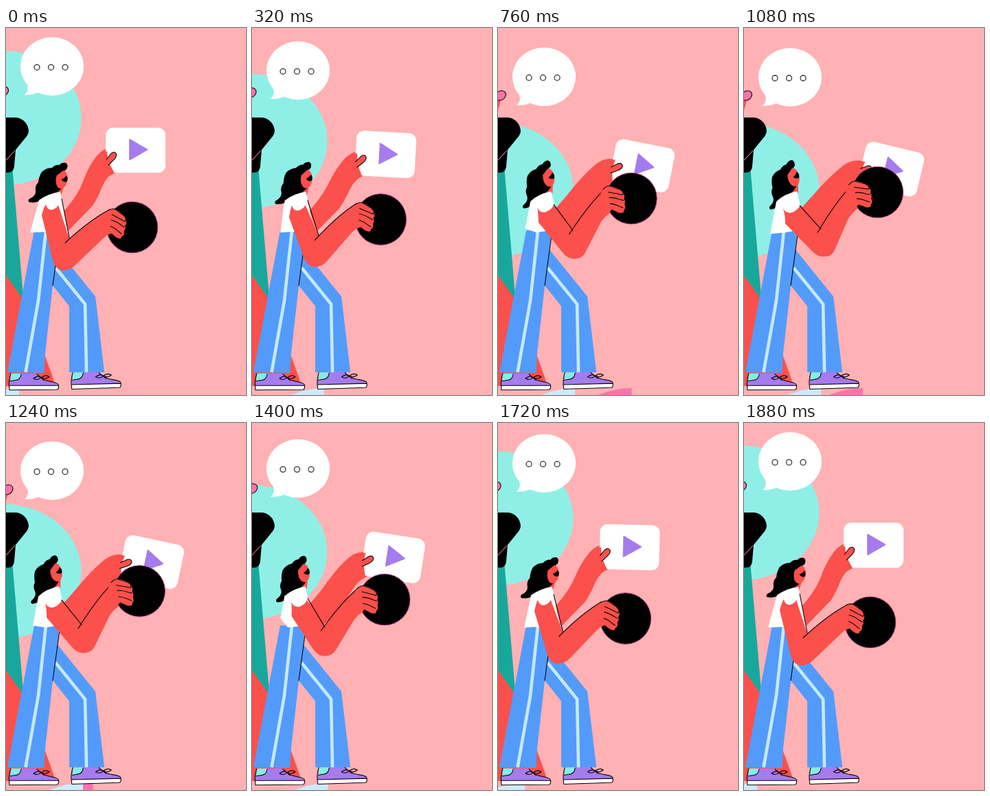
An HTML page for the animation above (1.92 s loop, 349 by 533 pixels).

```html
<!DOCTYPE html>
<html lang="en">
<head>
<meta charset="utf-8">
<title>Sharing</title>
<style>
  html, body { margin: 0; width: 100%; height: 100%; overflow: hidden; background: #ffb1b3; }
  svg { display: block; width: 100%; height: 100%; }
  .skin { fill: #fb504b; }
  .ink { fill: none; stroke: #0a0508; stroke-width: 1.1; stroke-linecap: round; stroke-linejoin: round; }
  .stripe { fill: none; stroke: #c5e9ff; stroke-width: 4.6; }
  .jeans { fill: #539bfa; }
  .white { fill: #fff; }
</style>
</head>
<body>
<svg viewBox="0 0 349 533">
  <defs>
    <g id="shoe">
      <path fill="#a67bee" d="M7 501H45Q52 511 66 513Q77 515 76 520H5Q4 511 7 501Z"/>
      <path fill="#86eee2" d="M7 501H22Q21 511 12 511L6 512Z"/>
      <path class="white" d="M4.500 518.500H76.500Q77 524 74 524.500L5 525Z"/>
      <path class="ink" d="M7 501Q4 511 4.500 518.500H76.500Q77 515 66 513Q52 511 45 502M4.500 518.500L5 525L74 524.500Q77 524 76.500 518.500M22 502Q21 511 12 511L6 512"/>
      <path class="ink" d="M40 508Q48 503 51 507Q46 512 40 508M51 507Q58 502 63 506Q58 510 51 507L55 511"/>
    </g>
  </defs>

  <ellipse id="disc" cx="-3" cy="130.500" rx="112.500" ry="97.500" fill="#8fefe6"/>

  <g id="bubble">
    <ellipse class="white" cx="67" cy="55.700" rx="46" ry="42.500"/>
    <path class="white" d="M30 80Q35 90 27 97Q40 98 50 92Z"/>
    <g fill="#fff" stroke="#333" stroke-width="1.300">
      <circle cx="45" cy="57" r="4"/><circle cx="65.500" cy="57" r="4"/><circle cx="86" cy="57" r="4"/>
    </g>
  </g>

  <g id="finger">
    <path class="skin" d="M-14 96L-4 98Q-5 106 -9 116L-14 116Z"/>
    <ellipse cx="-4" cy="92" rx="8" ry="6.500" transform="rotate(-38 -4 92)" fill="#fb72aa" stroke="#0a0508" stroke-width="1.100"/>
  </g>
  <path class="skin" d="M0 356L24 385L69 510Q71 518 66 519L0 520Z"/>
  <path fill="#18a89b" d="M0 200H9L25.500 395L0 359Z"/>
  <path d="M0 130H14C27 131 33 142 33 150Q32 156 27 161L14 177L12 201Q11 210 3 210H0Z"/>
  <path d="M0 192L13 178" stroke="#f2709f" stroke-width="1.100"/>

  <path id="pinkWedge" fill="#fb72aa" d="M0 523A125 125 0 0 0 -125 648H0Z"/>
  <path id="blueWedge" fill="#cdeafd" d="M0 523A125 125 0 0 0 -125 648H0Z"/>

  <path id="farArm" class="skin"/>
  <path class="jeans" d="M70 318L75 322L130 390L143 500H92V404L68 374Z"/>
  <path class="stripe" d="M72 348L115 401L117 500"/>
  <path class="jeans" d="M41 294H78L68 374L57 472L55.500 501L2 500Z"/>
  <path class="stripe" d="M58 294L47 396L28.500 500"/>
  <path class="ink" d="M78 300L68 374"/>
  <use href="#shoe" y="0.700"/>
  <use href="#shoe" transform="translate(90.600 -0.500) rotate(-1.500 5 520)"/>

  <g id="head">
    <path class="skin" d="M70 226L84 231L80 243L64 247Z"/>
    <path d="M78 199Q81 195 87 196Q91 199 88 205L82 210V232Q76 239 66 242Q60 246 53 248Q46 255 34 253Q31 251 34 248Q44 244 43 236Q42 229 47 224Q48 215 52 209Q58 203 67 203Q72 198 78 199Z"/>
    <ellipse class="skin" cx="81" cy="220" rx="8.500" ry="13.500" transform="rotate(8 81 220)"/>
    <path d="M78 199Q81 195 87 196Q91 199 88 205L82 208L74 214Z"/>
    <path d="M80.500 220Q85 218 88 214.500Q91 218 88.500 223Q84 225 80.500 220Z"/>
  </g>
  <path id="shirt" class="white"/>

  <g id="card">
    <rect class="white" x="145" y="144.700" width="87" height="65.500" rx="11"/>
    <path fill="#a67bee" stroke="#a67bee" stroke-width="2" stroke-linejoin="round" d="M180 162L205 176.500L180 191Z"/>
    <g id="thumb">
      <path class="skin" d="M138 182L147 179L148 188L153 182Q158 178 160.500 183Q161 187 157 191L151 198L158 211L140 220L130 200Z"/>
      <path class="ink" d="M146 191L153 182Q158 178 160.500 183Q161 187 157 191L149 199"/>
    </g>
  </g>

  <circle id="ball" r="37.300" stroke="#c4559a"/>
  <path id="nearArm" class="skin"/>
  <path id="armEdge" class="ink"/>
  <path id="elbowEdge" class="ink"/>
  <g id="hand">
    <path class="skin" d="M140 273Q148 263 156 262.500Q164 264 171 272Q176 276 174.500 280Q176 284 173 287Q175 291 171.500 295Q173 300 168 303Q168 308 160 304L152 297L142 300Z"/>
    <path class="ink" d="M148 265Q155 261 160 264L171 272Q176 277 173 281L154 271M153 279Q161 281 167 286L172 289M152 288Q158 290 163 295L168 299"/>
  </g>
</svg>
<script>
const LOOP = 1920, STEP = 40;
const $ = id => document.getElementById(id);
const ease = u => (1 - Math.cos(Math.PI * Math.min(1, Math.max(0, u)))) / 2;
const ramp = (t, from, to) => ease((t - from) / (to - from));
const swing = (t, peak) => (1 + Math.cos(2 * Math.PI * (t - peak) / LOOP)) / 2;

// Paths of the low and the raised pose; matching numbers are blended.
const poses = {
  farArm: [
    "M84 266Q104 244 112 223Q118 206 126 194Q136 178 147 175L158 210Q147 214 140 230Q133 248 126 258L90 295Z",
    "M82 263Q96 248 110 232Q126 215 138 205Q156 188 174 194L178 226Q160 232 150 246Q138 262 130 274L108 295Z"],
  shirt: [
    "M48 250Q62 240 79 238L92 304L80 300L62 296L35 297L48 250Z",
    "M47 252Q58 241 77 237L83 262L88 285L76 294L60 297L38 299L47 252Z"],
  nearArm: [
    "M52 272Q54 262 58 256Q60 265 67 264Q74 262 76 257L92 306Q118 282 150 264L156 298Q148 299 142 305L102 343Q94 352 82 352Q72 351 68 338Z",
    "M60 284Q60 272 57 262Q61 270 70 268Q79 264 82 257L112 291Q135 252 157 226L165 262Q158 268 152 276L132 322Q128 332 117 332Q107 333 98 323Z"],
  armEdge: ["M81 248L92 305", "M81 258L112 292"],
  elbowEdge: ["M86 312Q120 280 150 264", "M107 297Q135 250 157 228"]
};

function blend([a, b], k) {
  const end = b.match(/[\d.]+/g);
  let i = 0;
  return a.replace(/[\d.]+/g, n => (+n + (end[i++] - n) * k).toFixed(2));
}

const move = (id, value) => $(id).setAttribute("transform", value);

function draw(t) {
  const s = (t + 20) % LOOP;
  const p = s < 1080 ? ease(s / 1080) : ease((LOOP - s) / 840);
  const bend = p + 0.15 * p * (1 - p);
  const sway = swing(t, 925);

  move("disc", `translate(0 ${112 * sway})`);
  move("bubble", `translate(0 ${16.3 * swing(t, 948) ** 0.75})`);
  move("finger", `translate(${8.5 * sway} ${6.5 * sway})`);

  const blueX = 19 + 93 * (ramp(t, 0, 390) - ramp(t, 1360, 1880));
  const pinkX = blueX + 91 * (ramp(t, 400, 850) - ramp(t, 900, 1360));
  move("blueWedge", `translate(${blueX} 0)`);
  move("pinkWedge", `translate(${pinkX} 0)`);

  for (const id in poses) $(id).setAttribute("d", blend(poses[id], bend));

  move("head", `translate(${-6 * p} ${3.5 * p}) rotate(${-20 * p} 60 225)`);
  move("card", `translate(${25.8 * p} ${27.5 * p}) rotate(${13.5 * p} 188.5 177.5)`);
  move("thumb", `rotate(${18 * p} 157 184)`);

  const dx = 10.8 * Math.sin(p * Math.PI / 2), dy = -51 * p;
  move("ball", `translate(${183.5 + dx} ${289.5 + dy})`);
  move("hand", `translate(${dx} ${dy}) rotate(${-20 * p} 183.5 289.5)`);
}

function tick() {
  draw(Math.floor(performance.now() % LOOP / STEP) * STEP);
  requestAnimationFrame(tick);
}
tick();
</script>
</body>
</html>
```
